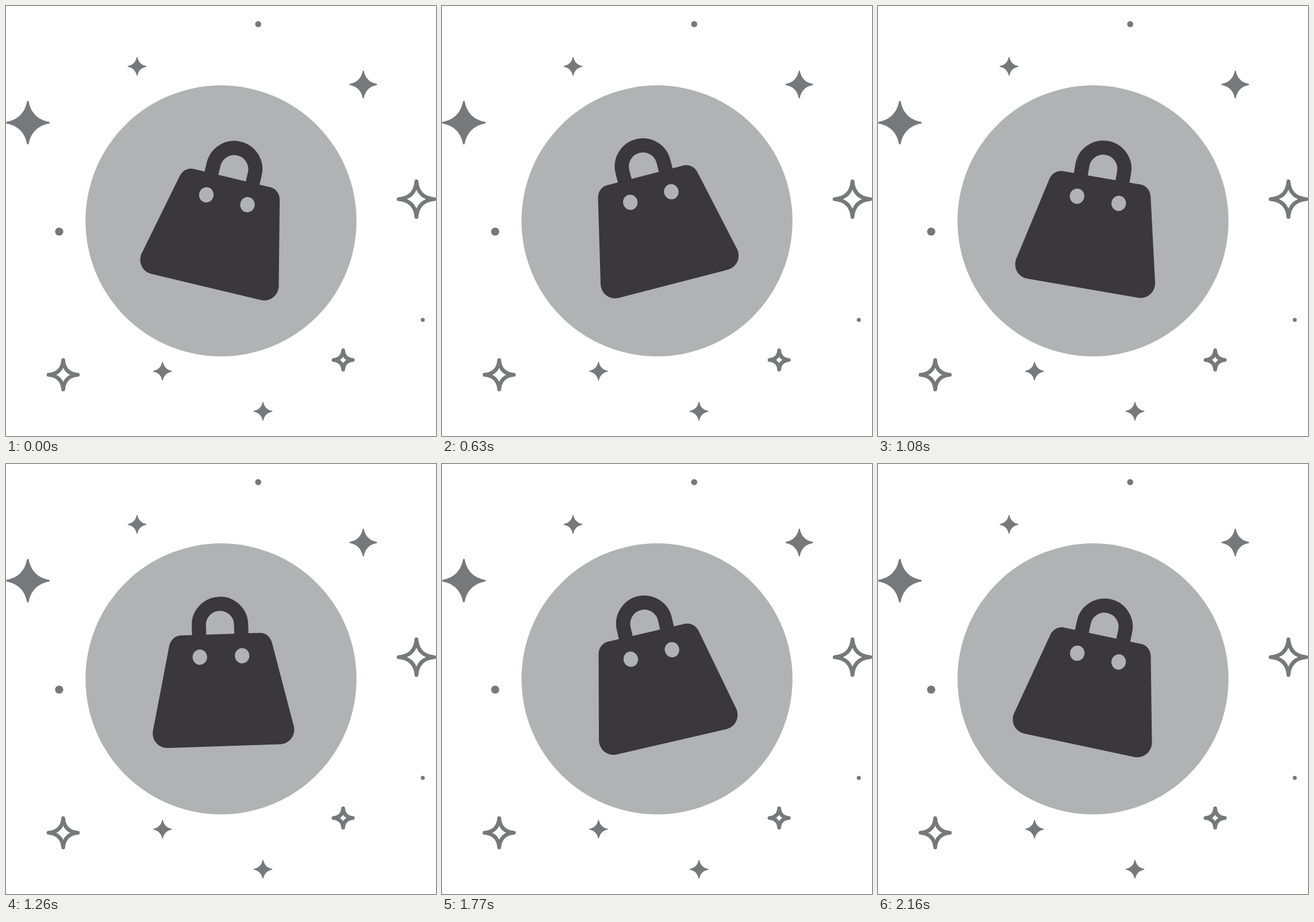
Recreate the animation shown at these times as an HTML page with a canvas. Size 748 by 748 pixels, loop 2.19 s.

```html
<!DOCTYPE html>
<html lang="en">
<head>
<meta charset="utf-8">
<title>Swinging bag</title>
<style>
html, body { margin: 0; width: 100%; height: 100%; overflow: hidden; background: #fff; }
canvas { display: block; width: 748px; height: 748px; }
</style>
</head>
<body>
<canvas id="stage" width="748" height="748"></canvas>
<script>
const ctx = document.getElementById('stage').getContext('2d');
const LOOP = 2190, STEP = 30;
const DISC = '#b1b2b4', BAG = '#3b383b', STAR = '#77787b';

// time, tilt in degrees, pivot x, pivot y
const KEYS = [
  [0, 13.4, 374.4, 378.4],
  [300, -7, 374.2, 374.2],
  [512, -19.7, 374, 372.6],
  [630, -14.5, 373.9, 373.4],
  [900, 1.15, 375.4, 378.7],
  [1065, 9.9, 375.3, 379],
  [1260, -1.9, 375.4, 377.2],
  [1605, -20, 374, 373],
  [1770, -13, 373.8, 372.7],
  [1860, -7.2, 373.8, 372.8],
  [2160, 12, 373.8, 378.3]
];

function key(i) {
  const n = KEYS.length, turn = Math.floor(i / n);
  const k = KEYS[i - turn * n].slice();
  k[0] += turn * LOOP;
  return k;
}

// Smooth slope at a key, flat where the motion turns
function slope(i, c) {
  const a = key(i - 1), b = key(i), d = key(i + 1);
  const s = (b[c] - a[c]) / (b[0] - a[0]);
  const r = (d[c] - b[c]) / (d[0] - b[0]);
  return s * r <= 0 ? 0 : 2 * s * r / (s + r);
}

function sample(t, c) {
  let i = KEYS.length - 1;
  while (KEYS[i][0] > t) i--;
  const a = key(i), b = key(i + 1), h = b[0] - a[0], u = (t - a[0]) / h;
  const v = 1 - u;
  return a[c] * v * v * (1 + 2 * u) + b[c] * u * u * (3 - 2 * u)
    + h * u * v * (v * slope(i, c) - u * slope(i + 1, c));
}

function dot(x, y, r, color) {
  ctx.fillStyle = color;
  ctx.beginPath();
  ctx.arc(x, y, r, 0, 7);
  ctx.fill();
}

function solidStar(x, y, r) {
  ctx.save();
  ctx.translate(x, y);
  ctx.scale(r, r);
  ctx.beginPath();
  ctx.moveTo(0.04, -0.97);
  for (let i = 0; i < 4; i++) {
    ctx.bezierCurveTo(0.14, -0.45, 0.45, -0.14, 0.97, -0.04);
    ctx.quadraticCurveTo(1.03, 0, 0.97, 0.04);
    ctx.rotate(Math.PI / 2);
  }
  ctx.fillStyle = STAR;
  ctx.fill();
  ctx.restore();
}

function lineStar(x, y, r) {
  const width = 6.6, k = r - width / 2;
  ctx.save();
  ctx.translate(x, y);
  ctx.beginPath();
  ctx.moveTo(0, -k);
  for (let i = 0; i < 4; i++) {
    ctx.bezierCurveTo(0.05 * k, -0.38 * k, 0.38 * k, -0.05 * k, k, 0);
    ctx.rotate(Math.PI / 2);
  }
  ctx.closePath();
  ctx.lineWidth = width;
  ctx.lineJoin = 'round';
  ctx.strokeStyle = STAR;
  ctx.stroke();
  ctx.restore();
}

function bag(x, y, deg) {
  ctx.save();
  ctx.translate(x, y);
  ctx.rotate(deg * Math.PI / 180);

  ctx.beginPath();
  ctx.moveTo(-36.8, -78);
  ctx.lineTo(-36.8, -97.3);
  ctx.arc(0, -97.3, 36.8, Math.PI, 0);
  ctx.lineTo(36.8, -78);
  ctx.lineWidth = 24.6;
  ctx.strokeStyle = BAG;
  ctx.stroke();

  ctx.beginPath();
  ctx.moveTo(-68.5, -81.3);
  ctx.lineTo(68.5, -81.3);
  ctx.bezierCurveTo(79, -81.3, 87, -74, 89.5, -63.3);
  ctx.lineTo(121.5, 78);
  ctx.bezierCurveTo(128, 98, 114, 113.5, 98, 113.5);
  ctx.lineTo(-98, 113.5);
  ctx.bezierCurveTo(-114, 113.5, -128, 98, -121.5, 78);
  ctx.lineTo(-89.5, -63.3);
  ctx.bezierCurveTo(-87, -74, -79, -81.3, -68.5, -81.3);
  ctx.fillStyle = BAG;
  ctx.fill();

  ctx.fillStyle = DISC;
  for (const side of [-1, 1]) {
    ctx.beginPath();
    ctx.ellipse(side * 36.8, -42.5, 12.6, 13.3, 0, 0, 7);
    ctx.fill();
  }
  ctx.restore();
}

function draw(t) {
  ctx.fillStyle = '#fff';
  ctx.fillRect(0, 0, 748, 748);

  solidStar(38, 203, 38);
  solidStar(228, 105, 16.5);
  solidStar(621.5, 136.5, 24.2);
  solidStar(272.3, 635.3, 16.5);
  solidStar(447, 705, 16.5);
  lineStar(714, 336, 34.3);
  lineStar(99.5, 641.5, 28.8);
  lineStar(586.5, 615.8, 20);
  dot(438.7, 31.5, 5.3, STAR);
  dot(92.5, 392.5, 7.1, STAR);
  dot(725, 546, 3.5, STAR);

  dot(374, 373.8, 235.7, DISC);
  bag(sample(t, 2), sample(t, 3), sample(t, 1));
}

const start = performance.now();
function tick() {
  const t = (performance.now() - start) % LOOP;
  draw(Math.floor(t / STEP) * STEP);
  requestAnimationFrame(tick);
}
tick();
</script>
</body>
</html>
```
